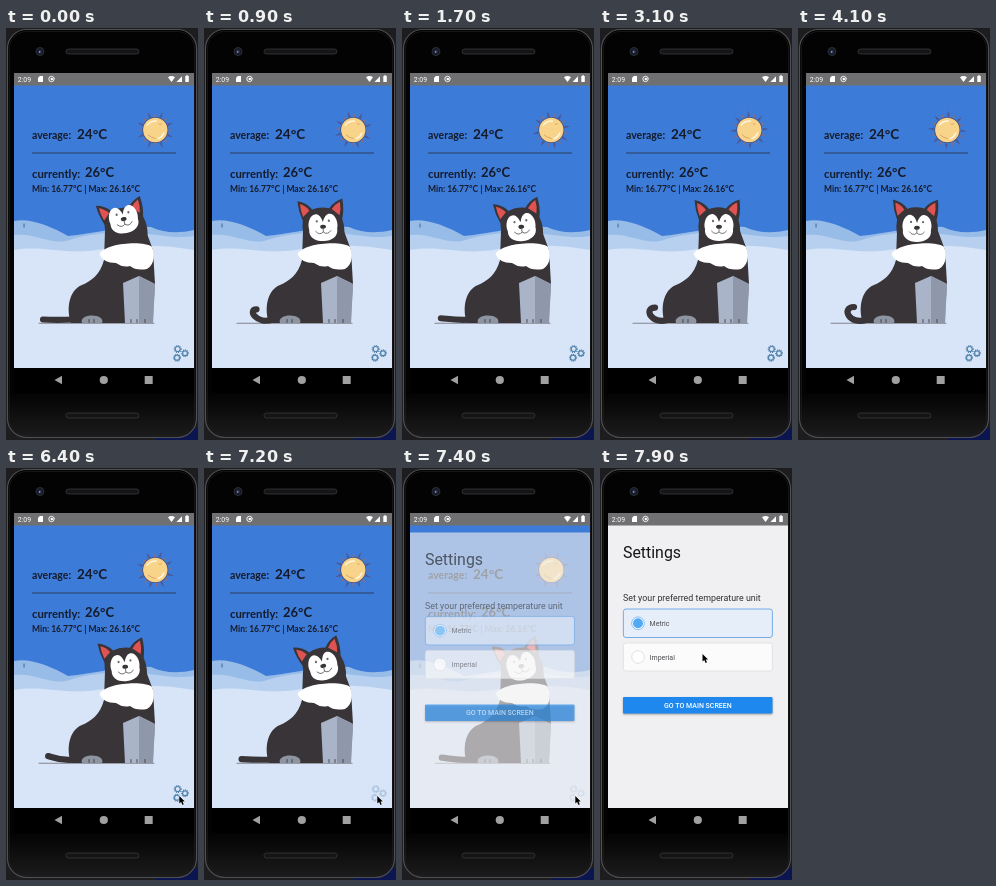
An HTML page with a canvas for the animation above (8000 ms loop, 192 by 412 pixels).

```html
<!DOCTYPE html>
<html lang="en">
<head>
<meta charset="utf-8">
<title>Weather dog</title>
<style>
html, body { margin: 0; width: 100%; height: 100%; overflow: hidden; background: #000; }
canvas { display: block; width: 192px; height: 412px; }
</style>
</head>
<body>
<canvas id="stage"></canvas>
<script>
const W = 192, H = 412, LOOP = 8000;
const canvas = document.getElementById('stage');
const ratio = Math.max(1, window.devicePixelRatio || 1);
canvas.width = W * ratio;
canvas.height = H * ratio;
const ctx = canvas.getContext('2d');
const TAU = Math.PI * 2;
const DARK = '#393437';

const clamp = v => Math.max(0, Math.min(1, v));
const mix = (a, b, k) => a + (b - a) * k;
const smooth = k => k * k * (3 - 2 * k);
const span = (t, a, b) => smooth(clamp((t - a) / (b - a)));

function rect(x, y, w, h, color, r = 0, line) {
  ctx.beginPath();
  ctx.roundRect(x, y, w, h, r);
  if (color) { ctx.fillStyle = color; ctx.fill(); }
  if (line) { ctx.strokeStyle = line; ctx.stroke(); }
}
function oval(x, y, rx, ry, color) {
  ctx.beginPath();
  ctx.ellipse(x, y, rx, ry, 0, 0, TAU);
  ctx.fillStyle = color;
  ctx.fill();
}
function ring(x, y, r, color, width) {
  ctx.beginPath();
  ctx.arc(x, y, r, 0, TAU);
  ctx.strokeStyle = color;
  ctx.lineWidth = width;
  ctx.stroke();
}
function fill(d, color) {
  ctx.fillStyle = color;
  ctx.fill(new Path2D(d));
}
function line(d, color, width) {
  ctx.strokeStyle = color;
  ctx.lineWidth = width;
  ctx.lineCap = ctx.lineJoin = 'round';
  ctx.stroke(new Path2D(d));
}
function text(s, x, y, size, color, family = 'Roboto', weight = 400) {
  ctx.font = `${weight} ${size}px ${family}, sans-serif`;
  ctx.fillStyle = color;
  ctx.fillText(s, x, y);
}

function phone() {
  rect(0, 0, W, H, '#1d1d20');
  rect(150, 400, 42, 12, '#0b1650');
  const shade = ctx.createLinearGradient(0, 365, 0, 410);
  shade.addColorStop(0, '#030303');
  shade.addColorStop(1, '#1c1c1d');
  ctx.lineWidth = 1.2;
  rect(1.5, 1.5, 189, 408, shade, 19, '#505053');
  ctx.lineWidth = 0.7;
  rect(3.5, 3.5, 185, 404, null, 17, '#1f1f21');
  oval(34, 23.5, 4.2, 4.2, '#141720');
  ring(34, 23.5, 4, '#34363d', 0.8);
  oval(34, 23.5, 2, 2, '#26304f');
  oval(33.6, 24, 0.8, 0.8, '#a9b0c4');
  for (const y of [21, 385]) {
    ctx.lineWidth = 0.8;
    rect(60, y, 73, 5, '#151517', 2.5, '#38383b');
  }
  rect(8, 340, 180, 25, '#000');
  fill('M48.5 352 L56 347.7 V356.3 Z', '#a0a0a0');
  oval(97.8, 352, 4.1, 4.1, '#a0a0a0');
  rect(138.7, 348, 8, 8, '#a0a0a0', 0.5);
}

function statusBar() {
  rect(8, 45, 180, 12.5, '#707073');
  text('2:09', 11.8, 53.8, 6.9, '#fff');
  fill('M32 50 L33.8 48 H37 V54 H32 Z', '#fff');
  ring(45.5, 51, 2.7, '#fff', 0.9);
  oval(45.8, 51, 1.2, 1.2, '#fff');
  fill('M162 49.3 Q165.5 46.8 169 49.3 L165.5 54 Z', '#fff');
  fill('M170.5 54 L176 48.2 V54 Z', '#fff');
  rect(179.3, 48, 3.5, 6, '#fff', 0.5);
  rect(180.2, 47.3, 1.7, 1, '#fff');
}

function sun(t) {
  ctx.save();
  ctx.translate(149.3, 102);
  ctx.save();
  ctx.rotate(t / 9000);
  for (let i = 0; i < 16; i++) {
    ctx.rotate(TAU / 16);
    const tip = i % 2 ? -17 : -19.5;
    fill(`M-1.3 -13.5 L0 ${tip} L1.3 -13.5 Z`, i % 2 ? '#8d6d7d' : '#4d5794');
  }
  ctx.restore();
  oval(0, 0, 13, 13, '#4a4c74');
  oval(0, 0, 12.2, 12.2, '#f8d38a');
  line('M-8 -5 Q-5 -9 1 -9 M3 8.5 Q7 7 8.5 3', '#fff5dd', 1.5);
  line('M-7 5 Q-4 8 0 8.5 M4 -6 H6', '#dda764', 1);
  ctx.restore();
}

function hills() {
  fill('M8 193 C24 190 44 198 62 208 C90 205 120 197 145 199 C160 206 174 205 188 202 V250 H8 Z', '#98bce8');
  fill('M8 207 C30 205 42 216 60 213 C90 203 125 203 150 207 C166 209 178 210 188 208 V250 H8 Z', '#b8d0ef');
  fill('M8 222 C38 217 58 227 91 222 C130 216 158 217 188 222 V340 H8 Z', '#d8e5f8');
  rect(17.6, 195.5, 0.9, 4, '#465a78');
}

// time in the 5 s cycle, head tilt, face lift, tail lowered
const poses = [
  [0, -12, -8, 1],
  [700, -2, 0, 0.1],
  [1700, -9, 0, 0.9],
  [2200, -15, -1, 0.97],
  [3100, 0, 0, 0.05],
  [4100, 1, 1, 0],
  [5000, -12, -8, 1]
];
function poseAt(t) {
  const p = t % 5000;
  const i = poses.findIndex(q => q[0] > p);
  const a = poses[i - 1], b = poses[i];
  const k = smooth((p - a[0]) / (b[0] - a[0]));
  return a.map((v, n) => mix(v, b[n], k));
}

function head(tilt, lift) {
  ctx.save();
  ctx.translate(120, 197);
  ctx.rotate(tilt * Math.PI / 180);
  ctx.translate(-120, -197);
  fill('M99 192 Q95 182 94.5 172 Q104 174 109 181 Q117 178 126 180.5 Q131 174 139.5 171.5 Q141 183 138.5 192 Q142 204 138 214 Q120 222 102 214 Q97 204 99 192 Z', DARK);
  fill('M99.5 188 Q97 181 97 175 Q102.5 177 106 182 Z', '#df5352');
  fill('M128.5 181.5 Q132 176.5 137 174.5 Q138 182 136 188 Z', '#df5352');
  ctx.translate(0, lift);
  fill('M105 201 C103 194 107 185 113 186 Q117 187 119 194 Q121 187 125 186 C131 185 135 194 133 201 C134 209 127 213 119 213 C111 213 104 209 105 201 Z', '#fff');
  oval(113, 193, 1.1, 1.2, '#6a6669');
  oval(125, 193, 1.1, 1.2, '#6a6669');
  oval(119, 198.7, 2.9, 2, DARK);
  line('M119 200 V203.5 M111.5 203 Q115 207.5 119 204 Q123 207.5 126.5 203', '#5a5558', 0.8);
  ctx.restore();
}

function dog(t) {
  const [, tilt, lift, low] = poseAt(t);
  const c = (up, down) => mix(up, down, low);
  line('M33 295.3 H148', '#85858c', 1.1);
  line(`M69 291.5 C${c(51, 56)} ${c(298, 292)} ${c(43, 46)} ${c(279, 292)} ${c(56, 37)} ${c(279, 291.5)}`, DARK, 6.2);
  fill('M99 203 L98 232 C94 247 85 253 76 257 C63 262 60 281 65 295 H146 L149 256 L147 222 L140 203 Z', DARK);
  fill('M76 295 C74 290 80 287.5 86 287.5 C93 287.5 98 291 96 295 Z', '#8d95a3');
  line('M83 291.5 V294.5 M88 291.5 V294.5', DARK, 0.8);
  fill('M117 255 L133 248 L149 256 L147 295 H119 Z', '#a9b4c8');
  fill('M133 248 L149 256 L147 295 H133 Z', '#8e98aa');
  line('M125 291.5 V294.5 M131 291.5 V294.5 M139 291.5 V294.5', DARK, 0.8);
  head(tilt, lift);
  fill('M93.5 226 C99 215 138 212 146 219 C149 226 149 236 141 241 Q130 243 124 238 Q117 240 110 235 Q97 235 93.5 226 Z', '#fff');
}

function gear(x, y, r) {
  ring(x, y, r, '#5388b0', 1.2);
  ctx.setLineDash([r * TAU / 16, r * TAU / 16]);
  ctx.lineCap = 'butt';
  ring(x, y, r + 0.9, '#46749c', 1.1);
  ctx.setLineDash([]);
}

function mainScreen(t) {
  rect(8, 57, 180, 283, '#3d7bd8');
  hills();
  sun(t);
  const ink = '#151b2a';
  text('average:', 26, 110.5, 10.5, ink, 'Lato', 700);
  text('24°C', 71, 110.5, 13.5, ink, 'Lato', 700);
  rect(26, 124.5, 144, 0.9, '#2c3e60');
  text('currently:', 26, 149.5, 11.3, ink, 'Lato', 700);
  text('26°C', 79, 149, 13, ink, 'Lato', 700);
  text('Min: 16.77°C | Max: 26.16°C', 26, 163.5, 8.5, ink, 'Lato', 700);
  dog(t);
  ctx.save();
  ctx.globalAlpha *= 1 - 0.7 * span(t, 7040, 7190);
  gear(171.7, 321, 2.5);
  gear(179, 325.2, 2.4);
  gear(171, 329.7, 2.5);
  ctx.restore();
}

function option(label, y, h, on) {
  ctx.lineWidth = 0.8;
  rect(23.4, y, 149, h, on ? '#e6eef9' : '#fbfbfc', 2.5, on ? '#579ce5' : '#dededf');
  const cy = y + h / 2;
  oval(38, cy, 6.3, 6.3, '#fff');
  ring(38, cy, 6.3, on ? '#67aeee' : '#dadadc', 0.8);
  if (on) oval(38, cy, 5, 5, '#52a9f4');
  text(label, 49.6, cy + 2.5, 7, '#4b4b4f');
}

function settings() {
  rect(8, 57, 180, 283, '#f0eff1');
  text('Settings', 23, 89.5, 15.9, '#161616');
  text('Set your preferred temperature unit', 23, 133.3, 8.9, '#333');
  option('Metric', 141, 28.5, true);
  option('Imperial', 175, 28, false);
  ctx.save();
  ctx.shadowColor = 'rgba(0,0,0,.35)';
  ctx.shadowBlur = 2 * ratio;
  ctx.shadowOffsetY = ratio;
  rect(23, 229, 149.5, 16.5, '#1e88ee', 1);
  ctx.restore();
  text('GO TO MAIN SCREEN', 64, 239.8, 7, '#fff', 'Roboto', 500);
}

function cursor(t) {
  if (t < 5000) return;
  const come = span(t, 5000, 5500), go = span(t, 7400, 7860);
  const x = mix(mix(190, 173.3, come), 102.5, go);
  const y = mix(mix(398, 328, come), 186, go);
  ctx.save();
  ctx.translate(x, y);
  const d = 'M0 0 V7.5 L1.8 6 L3.1 9 L4.5 8.3 L3.2 5.5 H5.6 Z';
  line(d, '#fff', 0.9);
  fill(d, '#000');
  ctx.restore();
}

function draw(t) {
  ctx.setTransform(ratio, 0, 0, ratio, 0, 0);
  ctx.globalAlpha = 1;
  phone();
  ctx.save();
  ctx.beginPath();
  ctx.rect(8, 45, 180, 295);
  ctx.clip();
  const fade = span(t, 7260, 7500);
  if (fade < 1) mainScreen(t);
  if (fade > 0) {
    ctx.globalAlpha = fade;
    ctx.translate(0, 20 * (1 - fade));
    settings();
    ctx.translate(0, -20 * (1 - fade));
    ctx.globalAlpha = 1;
  }
  statusBar();
  ctx.restore();
  cursor(t);
}

const start = performance.now();
function tick() {
  draw((performance.now() - start) % LOOP);
  requestAnimationFrame(tick);
}
tick();
</script>
</body>
</html>
```
